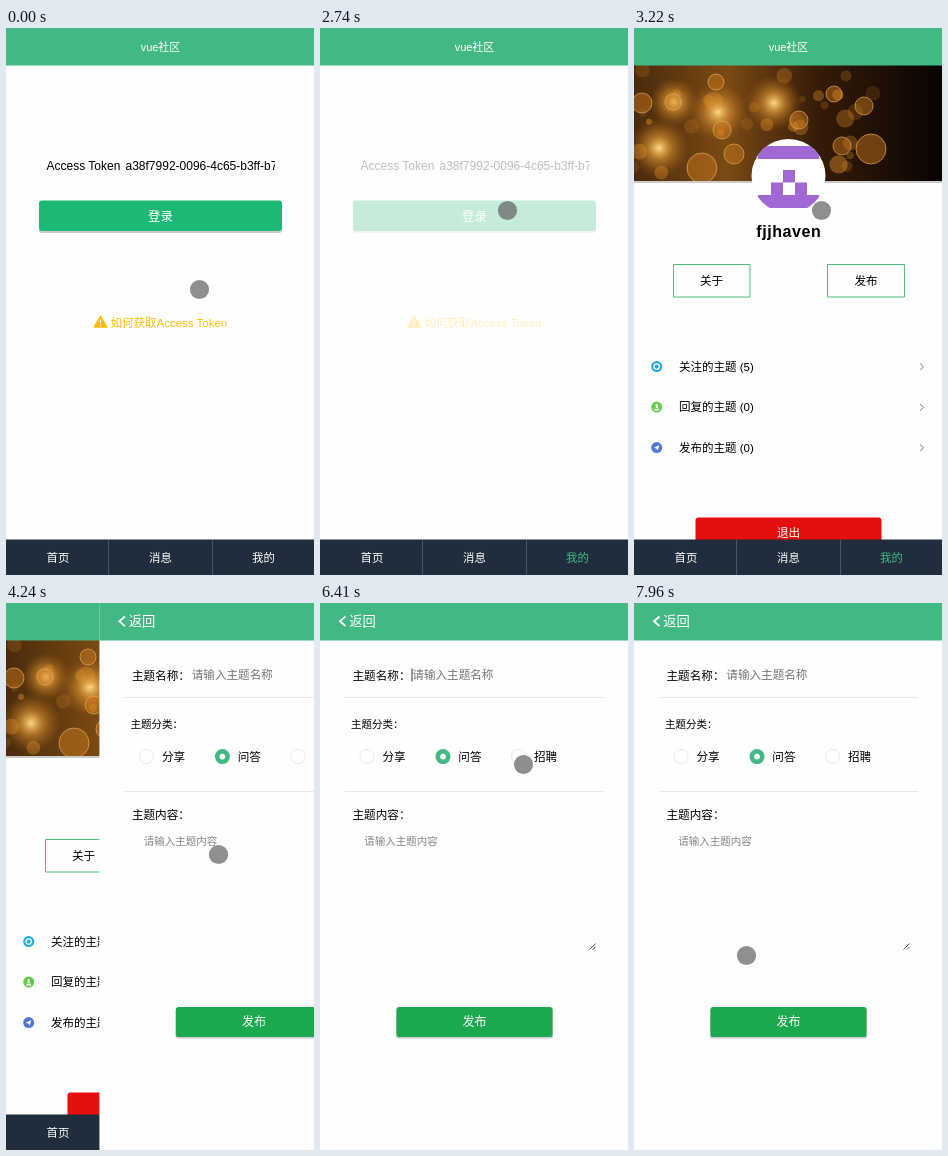
Recreate the animation shown at these times as an HTML page. Size 308 by 547 pixels, loop 8000 ms.

```html
<!DOCTYPE html>
<html lang="zh-CN">
<head>
<meta charset="utf-8">
<style>
html, body { margin: 0; width: 100%; height: 100%; overflow: hidden; background: #fefefe }
svg { display: block; width: 100%; height: 100%; font: 11.6px "Liberation Sans", "Noto Sans CJK SC", sans-serif }
.mid { text-anchor: middle }
.white { fill: #fff }
.line { fill: none; stroke: #e8e8e8 }
.shade { fill: #000; opacity: .2 }
</style>
</head>
<body>
<svg viewBox="0 0 308 547">
  <defs>
    <clipPath id="tokenBox"><rect x="119" y="125" width="150" height="25"/></clipPath>
    <clipPath id="photoBox"><rect y="37" width="308" height="116"/></clipPath>
    <clipPath id="face"><circle cx="154.5" cy="148" r="37"/></clipPath>
    <linearGradient id="dusk">
      <stop stop-color="#4a2a0c"/><stop offset=".3" stop-color="#7a4a14"/>
      <stop offset=".6" stop-color="#351b08"/><stop offset="1" stop-color="#080402"/>
    </linearGradient>
    <radialGradient id="glow">
      <stop stop-color="#ffd985"/><stop offset=".4" stop-color="#e09a35" stop-opacity=".6"/>
      <stop offset="1" stop-color="#a86414" stop-opacity="0"/>
    </radialGradient>
  </defs>
  <rect width="308" height="547" fill="#fefefe"/>

  <g id="login">
    <g font-size="12">
      <text x="40.5" y="142">Access Token</text>
      <text x="119.5" y="142" clip-path="url(#tokenBox)">a38f7992-0096-4c65-b3ff-b7</text>
    </g>
    <rect class="shade" x="33" y="174" width="243" height="31" rx="3"/>
    <rect x="33" y="172.5" width="243" height="30.5" rx="3" fill="#1db974"/>
    <text class="mid white" x="154.5" y="192.6" font-size="12.4">登录</text>
    <g fill="#ffbe00">
      <path d="M94.5 288.5 L100.5 299 H88.5Z" stroke="#ffbe00" stroke-width="1.6" stroke-linejoin="round"/>
      <path d="M94.5 291.5 V295.5 M94.5 296.8 V298" stroke="#fff" stroke-width="1.2"/>
      <text x="104.5" y="299" font-size="11.5">如何获取Access Token</text>
    </g>
  </g>

  <g id="profile">
    <rect width="308" height="475" y="37" fill="#fefefe"/>
    <rect class="shade" y="153" width="308" height="2"/>
    <g id="photo" clip-path="url(#photoBox)">
      <rect y="37" width="308" height="116" fill="url(#dusk)"/>
    </g>
    <circle class="white" cx="154.5" cy="148" r="37"/>
    <path clip-path="url(#face)" fill="#a068d4"
      d="M123.7 118h61.6v13h-61.6z M149 142h12v12.5h12v12.5h12.3v13h-61.6v-13h13.3v-12.5h12z"/>
    <rect class="white" x="149" y="154.5" width="12" height="12.5"/>
    <text class="mid" x="154.8" y="209" font-size="16" font-weight="bold" letter-spacing=".55">fjjhaven</text>
    <path d="M39.5 236.5h76.5v32.5h-76.5z M193.5 236.5h77v32.5h-77z" fill="none" stroke="#4fbd7c"/>
    <text class="mid" x="77.5" y="257.2">关于</text>
    <text class="mid" x="232" y="257.2">发布</text>
    <g fill="none" stroke="#fff" stroke-width="1.3">
      <circle cx="22.7" cy="338.6" r="5.5" fill="#1eaae6" stroke="none"/>
      <circle cx="22.7" cy="338.6" r="2.7"/>
      <circle cx="22.7" cy="379.1" r="5.5" fill="#66cc50" stroke="none"/>
      <path d="M22.7 376v4 M20.3 381.6h4.8" stroke-width="1.9"/>
      <circle cx="22.7" cy="419.6" r="5.5" fill="#5078d8" stroke="none"/>
      <path d="M19.7 419.8l5.6-2.6-1.6 5.2-1.4-2z" fill="#fff" stroke="none"/>
    </g>
    <g font-size="11.5">
      <text x="45" y="342.8">关注的主题 (5)</text>
      <text x="45" y="383.3">回复的主题 (0)</text>
      <text x="45" y="423.8">发布的主题 (0)</text>
    </g>
    <path d="M286 335.3l3.5 3.5-3.5 3.5 m0 33.5l3.5 3.5-3.5 3.5 m0 33.5l3.5 3.5-3.5 3.5" fill="none" stroke="#777"/>
    <rect x="61.5" y="489.5" width="186" height="31" rx="3" fill="#e60f0f"/>
    <text class="mid white" x="154.5" y="508.6" font-weight="500">退出</text>
  </g>

  <rect width="308" height="37.5" fill="#42b983"/>
  <text class="mid white" x="154.5" y="22.8" font-size="11" font-weight="500">vue社区</text>
  <g id="nav" class="mid white" font-size="11.4">
    <rect y="511.5" width="308" height="36" fill="#1f2d3d"/>
    <path d="M102.5 512v35 M206.5 512v35" stroke="#475669"/>
    <text x="52" y="534.4">首页</text>
    <text x="154.5" y="534.4">消息</text>
    <text id="mine" x="257.5" y="534.4">我的</text>
  </g>

  <g id="form">
    <rect width="308" height="547" fill="#fefefe"/>
    <rect width="308" height="37.5" fill="#42b983"/>
    <path d="M25.5 13.5l-5.5 4.8 5.5 4.8" fill="none" stroke="#fff" stroke-width="1.8"/>
    <text class="white" x="29.3" y="23" font-size="13.3" font-weight="500">返回</text>
    <text x="32.5" y="76.6">主题名称：</text>
    <text x="92.3" y="76" fill="#757575">请输入主题名称</text>
    <path id="titleCaret" d="M92 65.5v13" stroke="#333"/>
    <path class="line" d="M25 94.5h259 M25 188.5h259"/>
    <text x="31" y="125" font-size="10.5">主题分类：</text>
    <g class="line" stroke="#ddd">
      <circle cx="47" cy="153.6" r="7.1"/>
      <circle cx="198.6" cy="153.6" r="7.1"/>
      <circle cx="123" cy="153.6" r="5.2" style="stroke:#42b983;stroke-width:4.6"/>
    </g>
    <text x="62.5" y="158">分享</text>
    <text x="138.3" y="158">问答</text>
    <text x="214" y="158">招聘</text>
    <text x="32.5" y="216.2">主题内容：</text>
    <text x="44.3" y="242" font-size="10.5" fill="#858585">请输入主题内容</text>
    <path id="bodyCaret" d="M44.5 233v11" stroke="#333"/>
    <path d="M269.5 346.5l6-6 M273 346.5l2.5-2.5" stroke="#555"/>
    <rect class="shade" x="76" y="405.5" width="157" height="30" rx="2.5"/>
    <rect x="76.5" y="404" width="156" height="30" rx="2.5" fill="#1ca84c"/>
    <text class="mid white" x="154.5" y="423.3" font-size="12" font-weight="500">发布</text>
  </g>

  <circle id="touch" r="9.6" fill="#646464" fill-opacity=".72"/>
</svg>
<script>
const LOOP = 8000;
const el = id => document.getElementById(id);
const [login, profile, photo, nav, mine, form, touch, titleCaret, bodyCaret] =
  ['login', 'profile', 'photo', 'nav', 'mine', 'form', 'touch', 'titleCaret', 'bodyCaret'].map(el);

// Bokeh lights: x, y, radius
function light(x, y, r, attrs) {
  const c = document.createElementNS('http://www.w3.org/2000/svg', 'circle');
  for (const [k, v] of Object.entries({ cx: x, cy: y, r, ...attrs })) c.setAttribute(k, v);
  photo.append(c);
}
let seed = 7;
const rnd = () => (seed = seed * 16807 % 2147483647) / 2147483647;
[[40, 74, 24], [84, 84, 30], [140, 75, 28], [25, 120, 30]].forEach(g => light(...g, { fill: 'url(#glow)' }));
for (let i = 0; i < 34; i++) {
  light(rnd() ** 1.3 * 240, 42 + rnd() * 106, 3 + rnd() * 7,
    { fill: '#e8962c', 'fill-opacity': .1 + rnd() * .35 });
}
[[68, 140, 15], [8, 75, 10], [39, 74, 8], [88, 102, 9], [100, 126, 10], [82, 54, 8],
 [200, 66, 8], [208, 118, 9], [237, 121, 15], [230, 78, 9], [165, 92, 9]].forEach(g =>
  light(...g, { fill: '#d07c20', 'fill-opacity': .45, stroke: '#efb060', 'stroke-opacity': .65 }));

// Pointer path: time, x, y
const path = [
  [0, 193.5, 261.5], [390, 193.5, 261.5], [670, 171.5, 300.5], [2010, 171.5, 300.5],
  [2190, 187.5, 182.5], [3300, 187.5, 182.5], [3520, 212.5, 251.5], [4620, 212.5, 251.5],
  [4970, 135, 79], [5720, 135, 79], [6250, 203.5, 161.5], [6820, 203.5, 161.5],
  [7150, 150, 262], [7400, 119, 336], [7620, 119, 336], [7940, 112.5, 352.5], [LOOP, 112.5, 352.5]
];
const ramp = (t, a, b) => Math.min(1, Math.max(0, (t - a) / (b - a)));
const show = (node, on) => node.setAttribute('visibility', on ? 'inherit' : 'hidden');
const blink = (t, from, to) => t >= from && t < to && Math.floor((t - from) / 500) % 2 === 0;

function draw(now) {
  const t = now % LOOP;
  const i = path.findIndex(p => p[0] > t);
  const [a, b] = [path[i - 1], path[i]];
  const k = ramp(t, a[0], b[0]);
  touch.setAttribute('cx', a[1] + (b[1] - a[1]) * k);
  touch.setAttribute('cy', a[2] + (b[2] - a[2]) * k);

  login.setAttribute('opacity', 1 - ramp(t, 2560, 2800));
  profile.setAttribute('opacity', ramp(t, 2800, 3210));
  const signedIn = t >= 2590;
  nav.setAttribute('font-weight', signedIn ? 500 : 400);
  mine.setAttribute('fill', signedIn ? '#42b983' : '#fff');
  mine.setAttribute('font-weight', 400);

  const slide = ramp(t, 3640, 4360) ** 2;
  show(form, slide > 0);
  form.setAttribute('transform', `translate(${308 * (1 - slide)})`);
  show(titleCaret, blink(t, 5000, 7200));
  show(bodyCaret, blink(t, 7200, LOOP));
  requestAnimationFrame(draw);
}
draw(performance.now());
</script>
</body>
</html>
```
